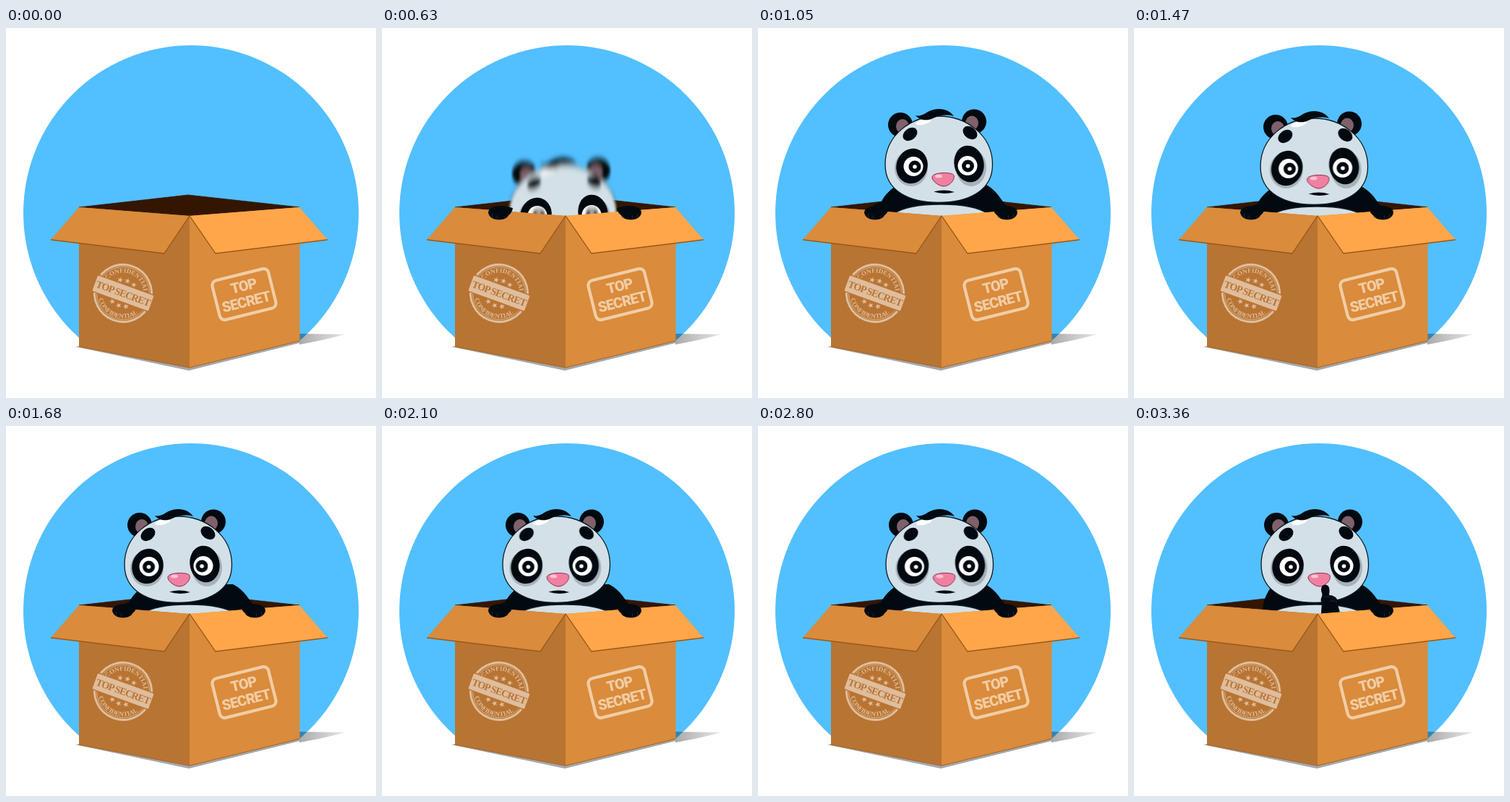
An HTML page without scripts that plays this animation: 512x512 px, repeating every 4270 ms.

```html
<!DOCTYPE html>
<html lang="en">
<head>
<meta charset="utf-8">
<title>Panda in a box</title>
<style>
html, body { margin: 0; width: 100%; height: 100%; overflow: hidden; background: #fff; }
svg { display: block; width: 100vw; height: 100vh; }

.ink { fill: #020a10; }
.fur { fill: #d3e0e7; stroke: #0b1a22; stroke-width: 1.3; }
.shade { fill: #a7b2b8; }
.white { fill: #fff; }
.claw { fill: none; stroke: #24323a; stroke-width: .8; }
.round { color: #dfbd9c; font: bold 14px "Liberation Serif", serif; }
.square { color: #f1cda6; font: 900 20px Roboto, sans-serif; letter-spacing: -1px; }
.round, .square { fill: currentColor; text-anchor: middle; }
.line { fill: none; stroke: currentColor; }
.arc { font-size: 8.8px; }

/* Every move is held in 70 ms steps. */
.hop, .rise, .smear, .look, .behind, .infront, .arm, .paw, .hand, .mouth {
  animation: 4270ms step-end infinite;
}
.hop { animation-name: hop; }
.rise { animation-name: rise; }
.smear { animation-name: smear; }
.look { animation-name: look; }
.behind { animation-name: behind; }
.infront { animation-name: infront; }
.arm { animation-name: arm; }
.paw { animation-name: paw; }
.hand { animation-name: hand; }
.mouth { animation-name: mouth; }

@keyframes hop {
  0% { transform: translateY(30px); }
  1.63% { transform: translateY(3px); }
  3.27% { transform: translateY(-7px); }
  4.91% { transform: translateY(-13px); }
  6.55% { transform: translateY(-4px); }
  8.19% { transform: none; }
}
@keyframes behind { 0% { opacity: 1; } 6.55% { opacity: 0; } }
@keyframes infront { 0% { opacity: 0; } 6.55% { opacity: 1; } }

@keyframes rise {
  0% { transform: translateY(150px); }
  13.11% { transform: translateY(110px); }
  14.75% { transform: translateY(65px); }
  16.39% { transform: translateY(16px); }
  18.03% { transform: translateY(-13px); }
  19.67% { transform: translateY(-22px); }
  21.31% { transform: translateY(-16px); }
  22.95% { transform: translateY(-8px); }
  24.58% { transform: translateY(-3px); }
  26.22% { transform: translateY(-1px); }
  27.86% { transform: none; }
}
@keyframes smear {
  0%, 18.03%, 37.7%, 52.45%, 65.57% { filter: none; }
  13.11% { filter: url(#smearY); }
  36.06%, 50.81%, 63.93% { filter: url(#smearX); }
}
@keyframes look {
  0% { transform: none; }
  34.42% { transform: translateX(calc(var(--k) * -1px)); }
  36.06% { transform: translateX(calc(var(--k) * -5px)); }
  37.7% { transform: translateX(calc(var(--k) * -10px)); }
  39.34% { transform: translateX(calc(var(--k) * -12px)); }
  49.18% { transform: translateX(calc(var(--k) * -9px)); }
  50.81% { transform: none; }
  52.45% { transform: translateX(calc(var(--k) * 9px)); }
  54.09% { transform: translateX(calc(var(--k) * 12.5px)); }
  62.29% { transform: translateX(calc(var(--k) * 10px)); }
  63.93% { transform: translateX(calc(var(--k) * 4px)); }
  65.57% { transform: translateX(calc(var(--k) * 1px)); }
  67.21% { transform: none; }
}

@keyframes paw {
  0% { transform: none; opacity: 1; }
  70.49% { transform: translate(5px, -4px); }
  72.13% { opacity: 0; }
}
@keyframes arm {
  0% { transform: none; }
  70.49% { transform: translate(4px, -1px); }
  72.13% { transform: translate(9px, 5px); }
  73.77% { transform: translate(18px, 20px); }
  75.4% { transform: translate(20px, 50px); }
}
@keyframes hand {
  0% { transform: translateY(60px); }
  73.77% { transform: translateY(28px); }
  75.4% { transform: translateY(9px); }
  77.04% { transform: translateY(-2px); }
  78.68% { transform: none; }
}
@keyframes mouth { 0% { opacity: 1; } 75.4% { opacity: 0; } }
</style>
</head>
<body>
<svg viewBox="0 0 512 512">
  <defs>
    <filter id="smearX" x="-20%" width="140%"><feGaussianBlur stdDeviation="2.5 0"/></filter>
    <filter id="smearY" y="-20%" height="140%"><feGaussianBlur stdDeviation="1.5 4"/></filter>
    <clipPath id="ground"><path d="M0 0H512V436H0Z"/></clipPath>
    <linearGradient id="cast">
      <stop stop-opacity=".33"/>
      <stop offset="1" stop-opacity=".1"/>
    </linearGradient>
    <g id="leftPaw">
      <path class="ink" d="M147 256C147 249 155 246 167 246L181 249C180 257 175 258 174 261C169 267 150 268 147 256Z"/>
      <path class="claw" d="M153 263Q151 260 153 257M160 265Q158 262 160 259"/>
    </g>
    <g id="rightPaw"><use href="#leftPaw" transform="matrix(-1 0 0 1 506 0)"/></g>
    <path id="star" d="M0-4 1-1.2 4-1.2 1.6.6 2.4 3.4 0 1.7-2.4 3.4-1.6.6-4-1.2-1-1.2Z"/>
    <g id="stars">
      <use href="#star" y="-18"/>
      <use href="#star" x="-10" y="-16"/>
      <use href="#star" x="10" y="-16"/>
    </g>
    <path id="over" d="M-28.500 0A28.500 28.500 0 0 1 28.500 0"/>
    <path id="under" d="M-34.500 0A34.500 34.500 0 0 0 34.500 0"/>
  </defs>

  <circle cx="256" cy="256" r="232" fill="#52bfff" clip-path="url(#ground)"/>
  <path d="M406 423L469 424Q440 432 406 438Z" fill="url(#cast)"/>
  <path d="M96 441L110 438 254 468 406 432 410 435 253 474Z" fill="#a3a7aa"/>
  <path d="M101 248L252 231 406 248 254 266Z" fill="#341600" stroke="#341600" stroke-width=".8"/>

  <g class="hop"><g class="behind"><use href="#leftPaw"/><use href="#rightPaw"/></g></g>

  <g class="rise">
    <path class="ink arm" d="M196 219C182 226 175 235 171 243L160 248V258L200 275Z"/>
    <path class="ink" d="M192 220C183 231 178 243 178 258V300H338L348 252C337 246 335 230 314 219Z"/>
    <path class="fur" d="M188 300V260C204 249 230 247 253 247S302 249 318 260V300Z"/>

    <g class="look" style="--k:1">
      <g class="smear">
        <circle class="ink" cx="197" cy="137" r="17"/>
        <ellipse cx="200" cy="139" rx="9" ry="10" fill="#80606a"/>
        <circle class="ink" cx="299" cy="132.500" r="17"/>
        <ellipse cx="296" cy="134.500" rx="9" ry="10" fill="#80606a"/>
        <path class="fur" d="M250 125C288 125 324.500 151 324.500 192C324.500 229 290 244.500 250 244.500S176 229 176 192C176 151 212 125 250 125Z"/>
        <ellipse class="white" cx="229" cy="133" rx="11" ry="3.5" transform="rotate(-14 229 133)"/>
        <path class="ink" d="M218 124C226 126 231 121 237 118C250 112 264 115 271 125C260 122 250 124 242 128C234 132 224 131 218 124Z"/>
        <g class="look ink" style="--k:.17">
          <ellipse cx="210.500" cy="150" rx="11" ry="8" transform="rotate(-38 210.500 150)"/>
          <ellipse cx="293.500" cy="148" rx="11" ry="8" transform="rotate(38 293.500 148)"/>
        </g>
      </g>

      <g class="look" style="--k:.42">
        <ellipse class="shade" cx="212" cy="197" rx="23" ry="25"/>
        <ellipse class="shade" cx="295" cy="196" rx="21" ry="26"/>
        <ellipse class="ink" cx="213" cy="194" rx="21.500" ry="24.500" transform="rotate(18 213 194)"/>
        <ellipse class="ink" cx="292" cy="191" rx="20.500" ry="25.500" transform="rotate(-12 292 191)"/>
        <circle class="white" cx="215" cy="194.500" r="13.500"/>
        <circle class="white" cx="290" cy="193.500" r="13.500"/>
        <g class="look" style="--k:.2"><g class="smear">
          <circle class="ink" cx="217" cy="195" r="8.500"/>
          <circle class="ink" cx="290.500" cy="194" r="8.500"/>
          <circle class="white" cx="217" cy="195" r="2.800"/>
          <circle class="white" cx="290.500" cy="194" r="2.800"/>
        </g></g>
        <path d="M241 209C242 202 270 202 271 207C273 214 264 222 257 222S240 214 241 209Z" fill="#f080a2" stroke="#8e2a4c"/>
        <ellipse cx="250" cy="208" rx="5" ry="2.500" fill="#fbc3d2"/>
        <path class="ink mouth" d="M243 229.500Q258 225.500 272 230Q257 234 243 229.500Z"/>
      </g>
    </g>
  </g>

  <g class="hand">
    <path class="ink" d="M258 270L260 245C256 239 262 236 260 231C257 224 261 219 266 220C271 221 271 227 270 234C277 234 283 239 282 245C281 249 286 255 287 270Z"/>
    <path class="claw" d="M262 237Q268 234 272 238M270 243Q276 240 281 244"/>
  </g>

  <path d="M101 248L254 260V470L101 441Z" fill="#b87432"/>
  <path d="M254 260L406.500 248V433L254 470Z" fill="#da8b3b"/>
  <path d="M101 441L254 470 406 433" fill="none" stroke="#a8621f"/>
  <path d="M101 248L254 260 219 312 62 293Z" fill="#da8b3b"/>
  <path d="M254 260L406 248 445 293 290 312Z" fill="#ffa64a"/>
  <path d="M62 293L219 312 254 260 290 312 445 293" fill="none" stroke="#9c5716" stroke-width="1.300"/>

  <g class="round" transform="translate(162 367) rotate(20)">
    <circle class="line" r="39.500" stroke-width="3"/>
    <circle class="line" r="36.500" stroke-width=".8"/>
    <text class="arc"><textPath href="#over" startOffset="50%">CONFIDENTIAL</textPath></text>
    <text class="arc"><textPath href="#under" startOffset="50%">CONFIDENTIAL</textPath></text>
    <use href="#stars"/>
    <use href="#stars" transform="rotate(180)"/>
    <rect x="-42" y="-12" width="84" height="24" rx="2" stroke="#b87432" stroke-width="1.500"/>
    <text y="5" letter-spacing="-.9" fill="#b87432">TOP SECRET</text>
  </g>

  <g class="square" transform="translate(329.500 368.500) rotate(-14)">
    <rect class="line" x="-40" y="-28" width="80" height="56" rx="7" stroke-width="4.200"/>
    <text x="2" y="-4.500">TOP</text>
    <text y="17.500">SECRET</text>
  </g>

  <g class="hop"><g class="infront">
    <g class="paw"><use href="#leftPaw"/></g>
    <use href="#rightPaw"/>
  </g></g>
</svg>
</body>
</html>
```
